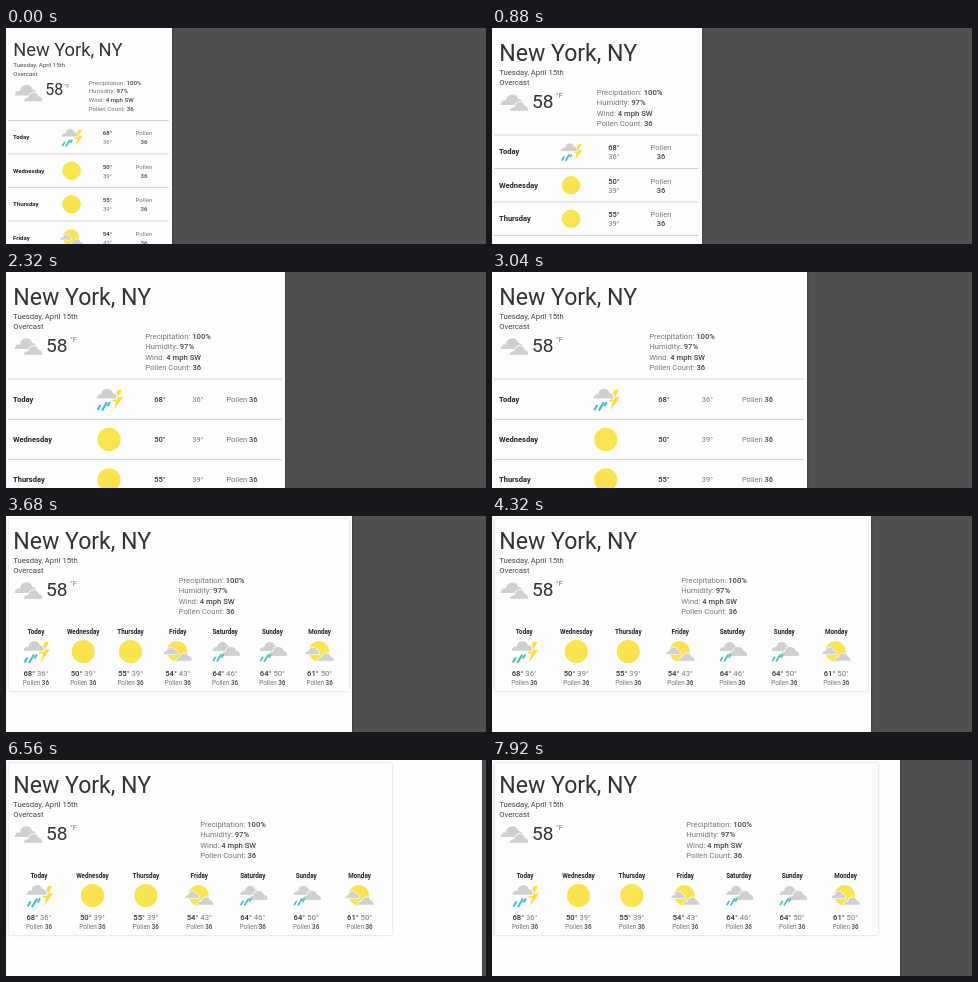
Write an HTML page that moves like this. It is 480x216 px and loops after 8 s.

```html
<!DOCTYPE html>
<html lang="en">
<head>
<meta charset="utf-8">
<title>Responsive weather card</title>
<style>
html, body { margin: 0; width: 100%; height: 100%; overflow: hidden; background: #505050; }
svg { display: block; width: 480px; height: 216px; font-family: Roboto, "Noto Sans", sans-serif; }
text { white-space: pre; }
.mid { text-anchor: middle; }
.title { fill: #333; }
.plain { fill: #444; }
.dark { fill: #444; font-weight: 500; }
.soft { fill: #757575; }
.day { fill: #222; font-weight: 700; }
.hi { fill: #333; font-weight: 500; }
.line { stroke: #d2d2d2; stroke-width: 1; }
.shade { filter: drop-shadow(0 .5px 1px rgba(0, 0, 0, .22)); }
.edge { filter: drop-shadow(0 0 1.5px rgba(0, 0, 0, .4)); }
</style>
</head>
<body>
<svg id="stage" viewBox="0 0 480 216"></svg>
<script>
const LOOP = 8000, STEP = 80;
const stage = document.getElementById('stage');

// [time in ms, panel width]
const WIDTHS = [[0, 166], [880, 210], [1760, 251.5], [2640, 295], [3520, 338], [4400, 383],
  [5280, 427], [6160, 471], [6400, 481], [6480, 481], [6560, 476], [7360, 437], [8000, 404]];

const DAYS = [
  ['Today', 'storm', 68, 36], ['Wednesday', 'sun', 50, 39], ['Thursday', 'sun', 55, 39],
  ['Friday', 'partly', 54, 43], ['Saturday', 'rain', 64, 46], ['Sunday', 'rain', 64, 50],
  ['Monday', 'partly', 61, 50]
];
const FACTS = [['Precipitation', '100%'], ['Humidity', '97%'], ['Wind', '4 mph SW'], ['Pollen Count', '36']];

// Header metrics for the two type scales
const SMALL = { title: 18.3, titleY: 27.6, body: 6.2, dateY: 39.4, skyY: 48.2, cloudY: 64,
  temp: 16, tempX: 39.2, tempY: 66.6, unitX: 58, unitY: 59.6, factY: 56.8, factStep: 8.65, listY: 92.5 };
const LARGE = { title: 23.1, titleY: 32.7, body: 7.7, dateY: 47.2, skyY: 57.2, cloudY: 73.5,
  temp: 19.2, tempX: 40, tempY: 79.6, unitX: 64, unitY: 69.8, factY: 67.3, factStep: 10.15, listY: 107 };

const text = (x, y, size, cls, str) => `<text x="${x}" y="${y}" font-size="${size}" class="${cls}">${str}</text>`;
const centred = (x, y, size, cls, str) => text(x, y + size * .355, size, cls + ' mid', str);
const span = (cls, str) => `<tspan class="${cls}">${str}</tspan>`;
const rule = (y, right) => `<path class="line" d="M2 ${y}H${right}"/>`;

// Flat-bottomed cloud, about 20 by 12 at scale 1
const cloud = (x, y, s, fill = '#cfcfcf') =>
  `<path transform="translate(${x} ${y}) scale(${s})" fill="${fill}" stroke="#fff" stroke-width="1"
    d="M0 12a4.5 4.5 0 0 1 5-5a6 6 0 0 1 11.6-1.5a5 5 0 0 1 4 6.5z"/>`;
const sun = (x, y, r) => `<circle cx="${x}" cy="${y}" r="${r}" fill="#f9e34f"/>`;
const drops = (x, y, s) =>
  `<path transform="translate(${x} ${y}) scale(${s})" d="M0 9l3-5M4.5 9.5l5-8.5M10 5l2.5-4"
    fill="none" stroke="#45bfc9" stroke-width="2.1"/>`;

const ICONS = {
  sun: sun(0, 0, 11.6),
  storm: '<path d="M9-9.5L3 2h4.2L4.5 11L14-2H9.3L13-9.5z" fill="#f9de3c"/>' +
    cloud(-13, -12.5, 1.02) + drops(-11.5, 2, 1),
  partly: sun(-.8, -.3, 10.3) + cloud(-14.5, -5.5, .7) + cloud(-2, .2, .79),
  rain: cloud(-13, -11.5, .95) + cloud(-4.5, -6.5, .95) + drops(-12, 2, .85)
};
const icon = (kind, x, y, s) => `<g transform="translate(${x} ${y}) scale(${s})">${ICONS[kind]}</g>`;

function panelWidth(t) {
  const i = WIDTHS.findIndex(([time]) => time > t);
  const [t0, w0] = WIDTHS[i - 1], [t1, w1] = WIDTHS[i];
  return Math.round(w0 + (w1 - w0) * (t - t0) / (t1 - t0));
}

function header(m, right) {
  const facts = FACTS.map(([label, value], i) =>
    text(right / 2 + 1.2, m.factY + i * m.factStep, m.body, 'soft', `${label}: ${span('dark', value)}`));
  return text(7.2, m.titleY, m.title, 'title', 'New York, NY') +
    text(7.2, m.dateY, m.body, 'plain', 'Tuesday, April 15th') +
    text(7.2, m.skyY, m.body, 'plain', 'Overcast') +
    cloud(8, m.cloudY - 9.5, 1.12) + cloud(17.5, m.cloudY - 1.2, .92) +
    text(m.tempX, m.tempY, m.temp, 'title', '58') +
    text(m.unitX, m.unitY, m.body * .95, 'soft', '°F') + facts.join('');
}

function stackedRow([name, kind, hi, lo], y, right, size) {
  const tempX = 25.5 + .466 * right, pollenX = 23.2 + .704 * right;
  return text(7, y + size * .355, size, 'day', name) +
    icon(kind, 15.5 + .307 * right, y, .8) +
    centred(tempX, y - 4.4, size, 'hi', hi + '°') + centred(tempX, y + 4.8, size, 'soft', lo + '°') +
    centred(pollenX, y - 4.4, size, 'soft', 'Pollen') + centred(pollenX, y + 4.8, size, 'dark', '36');
}

function inlineRow([name, kind, hi, lo], y, right, size) {
  const grow = right - 276;
  return text(7, y + size * .355, size, 'day', name) +
    icon(kind, 103 + .3 * grow, y, 1) +
    centred(154 + .5 * grow, y, size, 'hi', hi + '°') +
    centred(192 + .65 * grow, y, size, 'soft', lo + '°') +
    centred(236 + .82 * grow, y, size, 'soft', 'Pollen ' + span('dark', '36'));
}

function list(m, right, row, pitch) {
  return DAYS.slice(0, 4).map((day, i) => {
    const top = m.listY + i * pitch;
    return rule(top, right) + row(day, top + pitch / 2, right, m.body * .98);
  }).join('');
}

function columns(right) {
  const pitch = (right - 12) / 7;
  return DAYS.map(([name, kind, hi, lo], i) => {
    const x = 6.3 + pitch * (i + .5);
    return centred(x, 116.1, 6.3, 'day', name) + icon(kind, x, 135.5, 1) +
      centred(x, 157.3, 7.7, 'soft', span('hi', hi + '°') + ` ${lo}°`) +
      centred(x, 166.6, 6.3, 'soft', 'Pollen ' + span('dark', '36'));
  }).join('');
}

function view(w) {
  const panel = `<rect class="edge" x="-9" y="-9" width="${w + 9}" height="234" fill="#fdfdfd"/>`;
  let body;
  if (w < 341) {
    const right = w - 3, m = w < 178 ? SMALL : LARGE;
    body = header(m, right) +
      (w < 222 ? list(m, right, stackedRow, 33.5) : list(m, right, inlineRow, 40.3));
  } else {
    // The card reaches its full size just before the panel does
    const right = w > 382 ? 386 : w - 3;
    body = `<rect class="shade" x="2.5" y="3" width="${right - 2.5}" height="172" rx="1" fill="#fdfdfd"/>` +
      header(LARGE, right) + columns(right);
  }
  return `<clipPath id="inside"><rect width="${w}" height="216"/></clipPath>${panel}<g clip-path="url(#inside)">${body}</g>`;
}

const start = performance.now();
let shown = -1;
function tick() {
  const t = Math.floor((performance.now() - start) % LOOP / STEP) * STEP;
  if (t !== shown) stage.innerHTML = view(panelWidth(shown = t));
  requestAnimationFrame(tick);
}
tick();
</script>
</body>
</html>
```
